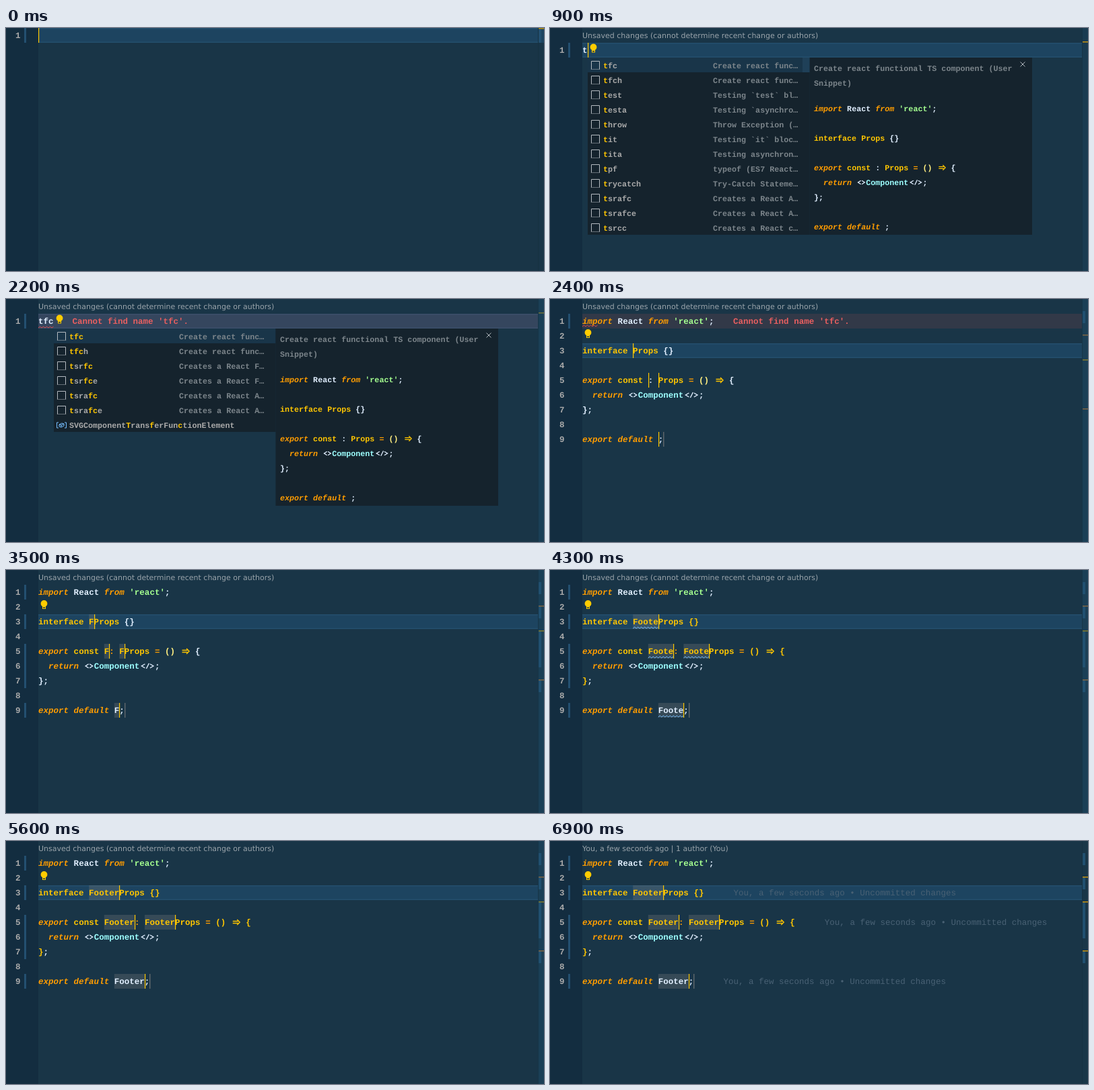
An HTML page for the animation above (7000 ms loop, 799 px wide and 362 px high).

```html
<!DOCTYPE html>
<html lang="en">
<head>
<meta charset="utf-8">
<title>Editor snippet</title>
<style>
  html, body { margin: 0; width: 100%; height: 100%; overflow: hidden; background: #193547; }
  svg { display: block; width: 799px; height: 362px; }
  text { white-space: pre; font: bold 12.53px "Liberation Mono", "Courier New", monospace; text-rendering: geometricPrecision; }
  .small text { font-size: 11.7px; }
  text.lens { font: 11px "DejaVu Sans", sans-serif; fill: #99a3aa; }
  .k { fill: #ff9d00; font-style: italic; }
  .o { fill: #ff9d00; }
  .y { fill: #ffc600; }
  .w { fill: #e1efff; }
  .s { fill: #a5ff90; }
  .c { fill: #9effff; }
  .p { fill: #ffee80; }
  .g { fill: #aaaaaa; }
  .d { fill: #7c858b; }
  .e { fill: #e85f60; }
  text.b { fill: #496174; font-weight: normal; }
  path.lig { fill: none; stroke-width: 1.4; }
</style>
</head>
<body>
<svg id="stage" viewBox="0 0 799 362"></svg>
<script>
const LOOP = 7000, LEFT = 48, ROW = 22, ADV = 7.52, SMALL = 7.02;
const stage = document.getElementById('stage');

// Each step changes some parts of the state at a time in ms.
const steps = [
  [0, { text: '', name: '', cur: 1, tick: '#b58f10', lens: '' }],
  [100, { cur: .5 }],
  [200, { cur: 0 }],
  [400, { cur: 1 }],
  [600, { text: 't' }],
  [900, { lens: 'old', pop: 't', bulb: 1, tick: '#c79312', bar: .6 }],
  [1000, { text: 'tf' }],
  [1100, { pop: 'tf' }],
  [1200, { text: 'tfc' }],
  [1500, { pop: 'tfc', bulb: 3 }],
  [1900, { wavy: 1 }],
  [2000, { cur: .5 }],
  [2100, { cur: 0 }],
  [2200, { err: 1, tick: '#747438', bar: 1 }],
  [2400, { open: 1, pop: '', cur: 1 }],
  [2600, { bars: 1 }],
  [2800, { err: 0, wavy: 0 }],
  [2900, { cur: .5 }],
  [3000, { cur: 0 }],
  [3200, { cur: 1 }],
  [3500, { name: 'F' }],
  [3600, { name: 'Fo' }],
  [3900, { name: 'Foo', pair: 1 }],
  [4000, { spell: 1 }],
  [4200, { name: 'Foot' }],
  [4300, { name: 'Foote' }],
  [4400, { name: 'Footer' }],
  [4500, { spell: 0 }],
  [4900, { cur: .7 }],
  [5000, { cur: .35 }],
  [5100, { cur: 0 }],
  [5400, { cur: .5 }],
  [5600, { cur: 1 }],
  [5900, { cur: .7 }],
  [6000, { cur: .35 }],
  [6100, { cur: 0 }],
  [6400, { cur: .5, lens: 'new', blame: 1 }],
  [6600, { cur: 1, bar: .3 }],
  [6900, { saved: 1, bar: .1 }]
];

const states = [];
steps.reduce((last, [at, change]) => {
  const s = { ...last, ...change, at };
  states.push(s);
  return s;
}, {});

const LENS = {
  old: 'Unsaved changes (cannot determine recent change or authors)',
  new: 'You, a few seconds ago | 1 author (You)'
};
const BLAME = 'You, a few seconds ago • Uncommitted changes';
const ERROR = "Cannot find name 'tfc'.";

const allItems = [
  ['tfc', 'Create react func…'], ['tfch', 'Create react func…'],
  ['test', 'Testing `test` bl…'], ['testa', 'Testing `asynchro…'],
  ['throw', 'Throw Exception (…'], ['tit', 'Testing `it` bloc…'],
  ['tita', 'Testing asynchron…'], ['tpf', 'typeof (ES7 React…'],
  ['trycatch', 'Try-Catch Stateme…'], ['tsrafc', 'Creates a React A…'],
  ['tsrafce', 'Creates a React A…'], ['tsrcc', 'Creates a React c…']
];
// The third value is where fuzzy matching begins.
const fewItems = [
  ...allItems.slice(0, 2),
  ['tsrfc', 'Creates a React F…'], ['tsrfce', 'Creates a React F…'],
  ['tsrafc', 'Creates a React A…'], ['tsrafce', 'Creates a React A…'],
  ['SVGComponentTransferFunctionElement', '', 12]
];

const LIGATURES = {
  '<>': 'M7-3L2.5 0 7 3M8.5-3L13 0 8.5 3',
  '</>': 'M8-3L3 0 8 3M14-4L10 4M15.5-3L20.5 0 15.5 3',
  '=>': 'M3-1.5h8M3 1.5h8M9.5-4L13.5 0 9.5 4'
};
const INK = { w: '#e1efff', y: '#ffc600' };

const esc = t => t.replace(/&/g, '&amp;').replace(/</g, '&lt;');
const text = (x, y, cls, t) => `<text x="${x}" y="${y}" class="${cls}">${esc(t)}</text>`;
const rect = (x, y, w, h, fill, more = '') =>
  `<rect x="${x}" y="${y}" width="${w}" height="${h}" fill="${fill}" ${more}/>`;
const colX = n => LEFT + n * ADV;
const rowY = n => n * ROW;

// Tokens are split by "~"; the first letter of each is its class.
function code(x, y, spec, adv = ADV) {
  let out = '', n = 0;
  for (const token of spec.split('~')) {
    const cls = token[0], t = token.slice(1), lig = LIGATURES[t];
    const at = x + n * adv;
    out += lig
      ? `<path class="lig" stroke="${INK[cls]}" transform="translate(${at} ${y - 4}) scale(${adv / ADV})" d="${lig}"/>`
      : text(at, y, cls, t);
    n += t.length;
  }
  return out;
}

function snippet(name, pair) {
  const b = pair ? 'y' : 'w';
  return [
    "kimport~w React ~kfrom~s 'react'~w;", '',
    `yinterface ${name}Props ~${b}{}`, '',
    `kexport~y const ${name}~${name ? 'o' : 'w'}: ~y${name}Props ~o= ~${pair ? 'y' : 'p'}()~w ~y=>~w ~${b}{`,
    'w  ~kreturn~w ~w<>~cComponent~w</>~w;',
    `${b}}~w;`, '',
    `kexport default~w ${name};`
  ];
}

function wave(x, y, w, color) {
  let d = `M${x} ${y}`;
  for (let i = 0; i * 2.5 < w - 1; i++) d += `l2.5 ${i % 2 ? 2 : -2}`;
  return `<path d="${d}" fill="none" stroke="${color}"/>`;
}

const currentLine = y =>
  rect(LEFT, y, 742, ROW, '#1d4460') + rect(LEFT, y, 742, 1.5, '#244f6d') + rect(LEFT, y + ROW - 1.5, 742, 1.5, '#244f6d');

const errorLine = (x, y) =>
  rect(LEFT, y, 742, ROW, 'rgba(228,85,84,.12)') + text(x, y + 15, 'e', ERROR);

const gutterBar = (y, h) => rect(27, y, 3, h, '#235070');

const caret = (x, y, o) => rect(Math.round(x), y, 1.2, ROW, '#ffc600', `opacity="${o}"`);

const bulb = (x, y) =>
  `<circle cx="${x}" cy="${y}" r="4.9" fill="#ffcc00"/>` +
  rect(x - 2.5, y + 3, 5, 3, '#ffcc00') +
  rect(x - 2, y + 5, 4, 2.5, '#193547', 'stroke="#ffcc00"');

const itemIcon = (x, y) =>
  `<path d="M${x + .5} ${y + 12}V${y + .5}h12V${y + 12}" fill="none" stroke="#b4bac0"/>` +
  `<path d="M${x} ${y + 12.5}h13" stroke="#b4bac0" stroke-dasharray="1 1"/>`;

const symbolIcon = (x, y) =>
  `<path transform="translate(${x} ${y})" d="M3-4H.5v8H3M12-4h2.5v8H12M4-1l4-2 3 1v3L7 3 4 2zl3 1 4-2M7 0v3" fill="none" stroke="#75beff"/>`;

function label(x, y, word, query, from = 0) {
  let hit = 0, out = '';
  [...word].forEach((ch, i) => {
    const on = i >= from && hit < query.length && ch.toLowerCase() === query[hit];
    if (on) hit++;
    out += `<tspan class="${on ? 'y' : 'g'}">${ch}</tspan>`;
  });
  return `<text x="${x}" y="${y}">${out}</text>`;
}

function popup(query) {
  const x = Math.round(colX(query.length)), y = 44;
  const items = query === 't' ? allItems : fewItems;
  let out = rect(x, y, 329.5, items.length * ROW, '#15232d') +
    rect(x, y, 329.5, ROW, '#193549') +
    rect(x + 329.5, y, 330.5, 264, '#15232d');
  if (query === 't') out += rect(x + 319, y, 10.5, ROW, '#1f4058');
  items.forEach(([word, desc, from], i) => {
    const cy = y + i * ROW + 11;
    out += from ? symbolIcon(x + 4, cy + 1) : itemIcon(x + 5, cy - 6);
    out += label(x + 23, cy + 5, word, query, from) + text(x + 186, cy + 5, 'd', desc);
  });
  const dx = x + 336;
  out += text(dx, 64, 'd', 'Create react functional TS component (User') + text(dx, 86, 'd', 'Snippet)');
  snippet('', 0).forEach((spec, i) => {
    if (spec) out += code(dx, 124 + i * ROW, spec, SMALL);
  });
  out += `<path d="M${x + 642.5} 50.5l7 7m0-7l-7 7" stroke="#b4bac0"/>`;
  return `<g class="small">${out}</g>`;
}

function ruler(s) {
  let out = rect(790, 0, 9, 362, '#1e4a66', `opacity="${.5 * (s.bar || 0)}"`) +
    rect(790, 0, 1, 362, '#15303f', 'opacity=".6"');
  if (!s.open) {
    if (!s.lens) out += rect(791, 0, 8, ROW, '#1d4460') + rect(791, 2, 4, 20, '#235070');
    return out + rect(791, s.lens ? 20 : 0, 8, 1.5, s.tick);
  }
  const marks = s.bars ? [[18, 18], [54, 18], [90, 55], [164, 18]] : [[18, 18]];
  for (const [y, h] of marks) out += rect(791, y, 4, h, '#215070');
  [53, 90, 163].forEach((y, i) => {
    out += rect(791, y, 8, 1.5, s.saved ? '#c8920f' : i === 1 ? '#827a2c' : '#806542');
  });
  return out;
}

function typing(s) {
  const y = s.lens ? ROW : 0;
  let out = currentLine(y) + gutterBar(y, ROW);
  if (s.err) out += errorLine(98.4, y);
  out += text(14, y + 15, 'g', '1') + text(LEFT, y + 15, 'w', s.text);
  if (s.wavy) out += wave(LEFT, y + 21, 22, '#e04a4a');
  if (s.pop) out += popup(s.pop);
  out += caret(colX(s.text.length), y, s.cur);
  if (s.bulb) out += bulb(colX(s.bulb) + 9, y + 6.5);
  return out;
}

function expanded(s) {
  const n = s.name.length;
  // Row and column of every linked placeholder.
  const fields = [[3, 10], [5, 13], [5, 15 + n], [9, 15]];
  let out = currentLine(rowY(3));
  if (s.err) out += errorLine(272, rowY(1));
  const bars = s.bars ? [[1, 1], [3, 1], [5, 3], [9, 1]] : [[1, 1]];
  for (const [row, count] of bars) out += gutterBar(rowY(row), count * ROW);
  for (const [row, c] of fields) {
    out += rect(colX(c), rowY(row), n * ADV, ROW, 'rgba(124,124,124,.3)');
  }
  snippet(s.name, s.pair).forEach((spec, i) => {
    const y = rowY(i + 1) + 15;
    out += text(14, y, 'g', String(i + 1));
    if (spec) out += code(LEFT, y, spec);
  });
  if (s.wavy) out += wave(LEFT, rowY(1) + 19, 22, '#e04a4a');
  for (const [row, c] of fields) {
    if (s.spell) out += wave(colX(c), rowY(row) + 21, n * ADV, '#75beff');
    out += caret(colX(c + n), rowY(row), s.cur);
  }
  out += rect(Math.round(colX(16 + n)), rowY(9), 1.5, ROW, '#5d656a');
  if (s.blame) {
    for (const [row, end] of [[3, 24], [5, 42], [9, 22]]) {
      out += text(colX(end) + 44, rowY(row) + 15, 'b', BLAME);
    }
  }
  return out + bulb(56.5, 50);
}

function draw(s) {
  let out = rect(0, 0, 799, 362, '#193547') + rect(0, 0, LEFT, 362, '#132d40');
  if (s.lens) out += text(LEFT, 15, 'lens', LENS[s.lens]);
  out += ruler(s) + (s.open ? expanded(s) : typing(s));
  stage.innerHTML = out;
}

let shown = null;
function tick() {
  const t = performance.now() % LOOP;
  let now = states[0];
  for (const s of states) if (s.at <= t) now = s;
  if (now !== shown) draw(shown = now);
  requestAnimationFrame(tick);
}
tick();
</script>
</body>
</html>
```
